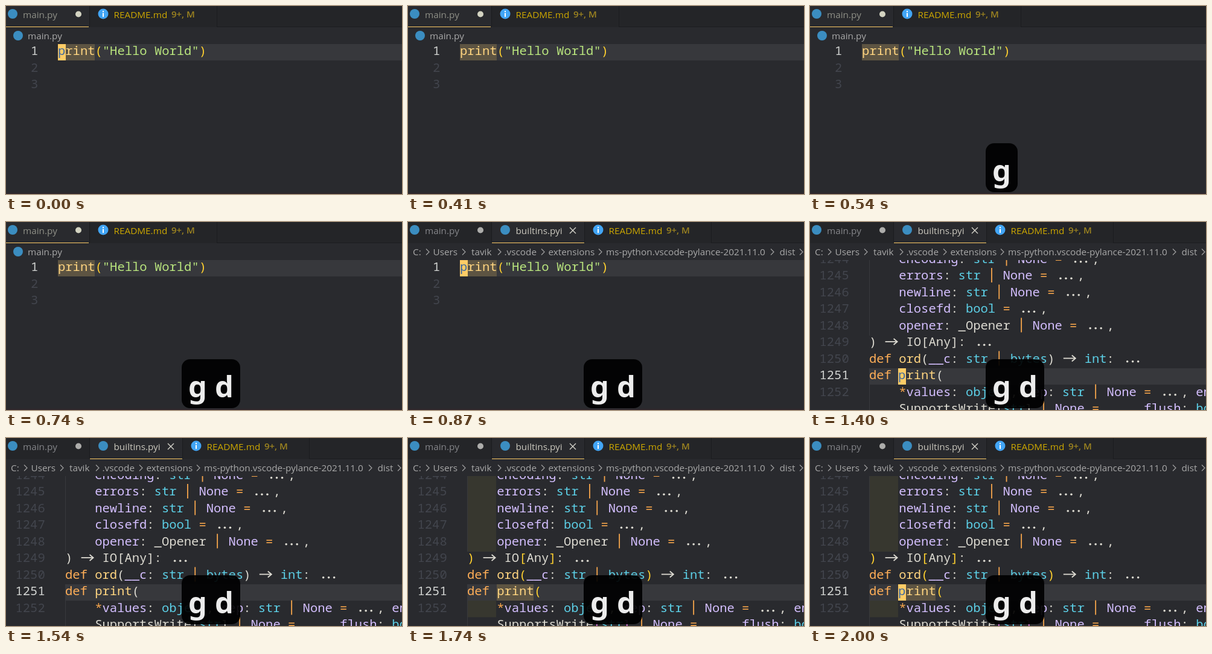
An HTML page with a canvas for the animation above (2.07 s loop, 656 px wide and 311 px high).

```html
<!DOCTYPE html>
<html lang="en">
<head>
<meta charset="utf-8">
<title>Go to definition</title>
<style>
html, body { margin: 0; width: 100%; height: 100%; overflow: hidden; background: #292a2e; }
canvas { display: block; }
</style>
</head>
<body>
<canvas id="stage" width="656" height="311"></canvas>
<script>
const ctx = document.getElementById("stage").getContext("2d");
const LOOP = 2070, W = 656, H = 311;
const CELL = 12.3, ROW = 27.5;
const UI = '15.3px "Open Sans", sans-serif';
const MONO = '500 20.5px "Noto Sans Mono", monospace';
const C = {
  bg: "#292a2e", bar: "#242528", edge: "#1b1c1f", line: "#37383c", word: "#5d5442",
  gold: "#ffcc66", ink: "#3a68a0", bracket: "#ffd02f", orchid: "#da70d6", plain: "#dddbd2",
  string: "#bae67e", func: "#ffd580", keyword: "#ffae57", type: "#5ccfe6",
  param: "#d4bfff", op: "#f7a64c", number: "#42454d", current: "#d0d2d0",
  guide: "#38393d", warn: "#cca700", crumb: "#a9a9a9", python: "#3b8dc0"
};
const WORDS = { def: C.keyword, None: C.param, ord: C.func, print: C.func };
for (const name of ["str", "bool", "bytes", "object", "int"]) WORDS[name] = C.type;

const LIBRARY = [
  "    encoding: str | None = ...,",
  "    errors: str | None = ...,",
  "    newline: str | None = ...,",
  "    closefd: bool = ...,",
  "    opener: _Opener | None = ...,",
  ") -> IO[Any]: ...",
  "def ord(__c: str | bytes) -> int: ...",
  "def print(",
  "    *values: object, sep: str | None = ..., end: str | None",
  "    SupportsWrite[str] | None = ..., flush: bool"
];

function box(x, y, w, h, color) {
  ctx.fillStyle = color;
  ctx.fillRect(x, y, w, h);
}

function disc(x, y, r, color) {
  ctx.fillStyle = color;
  ctx.beginPath();
  ctx.arc(x, y, r, 0, Math.PI * 2);
  ctx.fill();
}

function label(text, x, y, color, font = UI) {
  ctx.font = font;
  ctx.fillStyle = color;
  ctx.fillText(text, x, y);
}

function stroke(color, width, ...points) {
  ctx.strokeStyle = color;
  ctx.lineWidth = width;
  ctx.beginPath();
  points.forEach(([x, y], i) => i ? ctx.lineTo(x, y) : ctx.moveTo(x, y));
  ctx.stroke();
}

function monoText(text, x, y, color) {
  [...text].forEach((ch, i) => label(ch, x + i * CELL, y, color, MONO));
}

function tokenColor(token, rest, bracketColor) {
  if (token[0] === '"') return C.string;
  if (Object.hasOwn(WORDS, token)) return WORDS[token];
  if (/^\w/.test(token) && rest[0] === ":") return C.param;
  if (/[()[\]]/.test(token)) return bracketColor;
  if (token === "=" || token === "*") return C.op;
  return C.plain;
}

function codeLine(text, x, y, bracketColor) {
  for (const match of text.matchAll(/"[^"]*"|\w+|->|\.\.\.|[^\s]/g)) {
    const token = match[0];
    const left = x + match.index * CELL;
    if (token === "...") {
      for (let i = -1; i <= 1; i++) disc(left + 1.5 * CELL + i * 9, y - 1.7, 1.8, C.plain);
    } else if (token === "->") {
      stroke(C.plain, 1.8, [left + 2, y - 7], [left + 22, y - 7]);
      stroke(C.plain, 1.8, [left + 16, y - 12], [left + 22, y - 7], [left + 16, y - 2]);
    } else if (token === "|") {
      stroke(C.op, 1.8, [left + CELL / 2, y - 19], [left + CELL / 2, y + 5]);
    } else {
      const rest = text.slice(match.index + token.length);
      monoText(token, left, y, tokenColor(token, rest, bracketColor));
    }
  }
}

function blockCursor(x, y) {
  box(x, y, 13, 27, C.gold);
  monoText("p", x, y + 18, C.ink);
}

function tab(x, w, active) {
  box(x, 0, w, 35, active ? C.bg : C.bar);
  box(x + w, 0, 1, 35, C.edge);
}

function readmeTab(x, w) {
  tab(x, w, false);
  disc(x + 22, 13, 8.5, "#42a5f5");
  box(x + 21, 11.5, 2, 6.5, "#ffffff");
  box(x + 21, 8, 2, 2, "#ffffff");
  label("README.md", x + 39.5, 20, C.warn);
  label("9+, M", x + 135, 19, "#9d8420", '600 15px "Open Sans", sans-serif');
}

function tabs(definition) {
  box(0, 0, W, 35, C.bar);
  box(0, 34, W, 1, C.edge);
  tab(0, 138, !definition);
  disc(11, 13, 8, C.python);
  label("main.py", 28, 20, definition ? "#85868a" : "#8f9087");
  disc(120, 13.5, 5, definition ? "#adadab" : "#d3d3c1");
  if (definition) {
    tab(139, 153, true);
    disc(161, 13, 8, C.python);
    label("builtins.pyi", 178.5, 20, "#cbc8be");
    stroke("#d0cec6", 1.4, [268, 9], [278, 19]);
    stroke("#d0cec6", 1.4, [278, 9], [268, 19]);
    box(139, 34, 153, 1, C.gold);
    readmeTab(293, 209);
  } else {
    box(0, 34, 137, 1, C.gold);
    readmeTab(139, 210);
  }
}

function breadcrumbs(definition) {
  if (!definition) {
    disc(20, 49, 8, C.python);
    label("main.py", 36, 54.5, C.crumb);
    return;
  }
  const parts = [["C:", 8], ["Users", 41.5], ["tavik", 105], [".vscode", 159.5], ["extensions", 232.5],
    ["ms-python.vscode-pylance-2021.11.0", 328], ["dist", 615.5]];
  for (const [text, x] of parts) label(text, x, 54.5, C.crumb);
  for (const x of [33, 93, 152, 224, 319, 604, 652])
    stroke("#a0a0a0", 1.2, [x - 3, 44.5], [x + 2, 49.5], [x - 3, 54.5]);
}

function scriptView(cursorOn) {
  box(86, 63, W - 86, 27, C.line);
  box(86, 63, 61, 27, C.word);
  for (let n = 1; n <= 3; n++)
    monoText(String(n), 41, 81 + (n - 1) * ROW, n === 1 ? C.current : C.number);
  codeLine('print("Hello World")', 86, 81, C.bracket);
  if (cursorOn) blockCursor(86, 63);
  box(0, 309, W, 2, "#30272b");
}

function libraryView(cursorOn, wordLit, decorated) {
  const left = 98, firstRow = 1244, current = 1251;
  ctx.save();
  ctx.beginPath();
  ctx.rect(0, 63, W, H - 63);
  ctx.clip();
  if (decorated) {
    box(left, 63, 48, 125, "#37372f");
    box(left, 269, 48, 27.5, "#37372f");
  }
  box(left, 63, 1, 125, C.guide);
  box(left, 269, 1, H - 269, C.guide);
  box(left, 242, W - left, 27, C.line);
  if (wordLit) box(147, 242, 61, 27, C.word);
  LIBRARY.forEach((text, i) => {
    const row = firstRow + i, y = 260 + (row - current) * ROW;
    const wrapped = i === LIBRARY.length - 1;
    if (!wrapped) monoText(String(row), 15.5, y, row === current ? C.current : C.number);
    const nested = wrapped ? C.orchid : C.bracket;
    codeLine(text, left, y, decorated ? nested : C.plain);
  });
  if (cursorOn) blockCursor(146, 242);
  ctx.restore();
}

function keyCaption(both) {
  const font = 'bold 49px "Noto Sans", sans-serif';
  ctx.fillStyle = "rgba(0, 0, 0, .92)";
  ctx.beginPath();
  ctx.roundRect(291, 227, both ? 97 : 53, 81, 14);
  ctx.fill();
  label("g", 302, 290, "#ececec", font);
  if (both) label("d", 346, 290, "#ececec", font);
}

function draw(t) {
  const definition = t >= 870;
  box(0, 0, W, H, C.bg);
  tabs(definition);
  breadcrumbs(definition);
  if (t < 1140) scriptView(t < 410 || definition);
  else libraryView(t < 1540 || t >= 2000, t < 1400 || t >= 1740, t >= 1740);
  if (t >= 540) keyCaption(t >= 740);
}

function tick() {
  draw(performance.now() % LOOP);
  requestAnimationFrame(tick);
}
tick();
</script>
</body>
</html>
```
